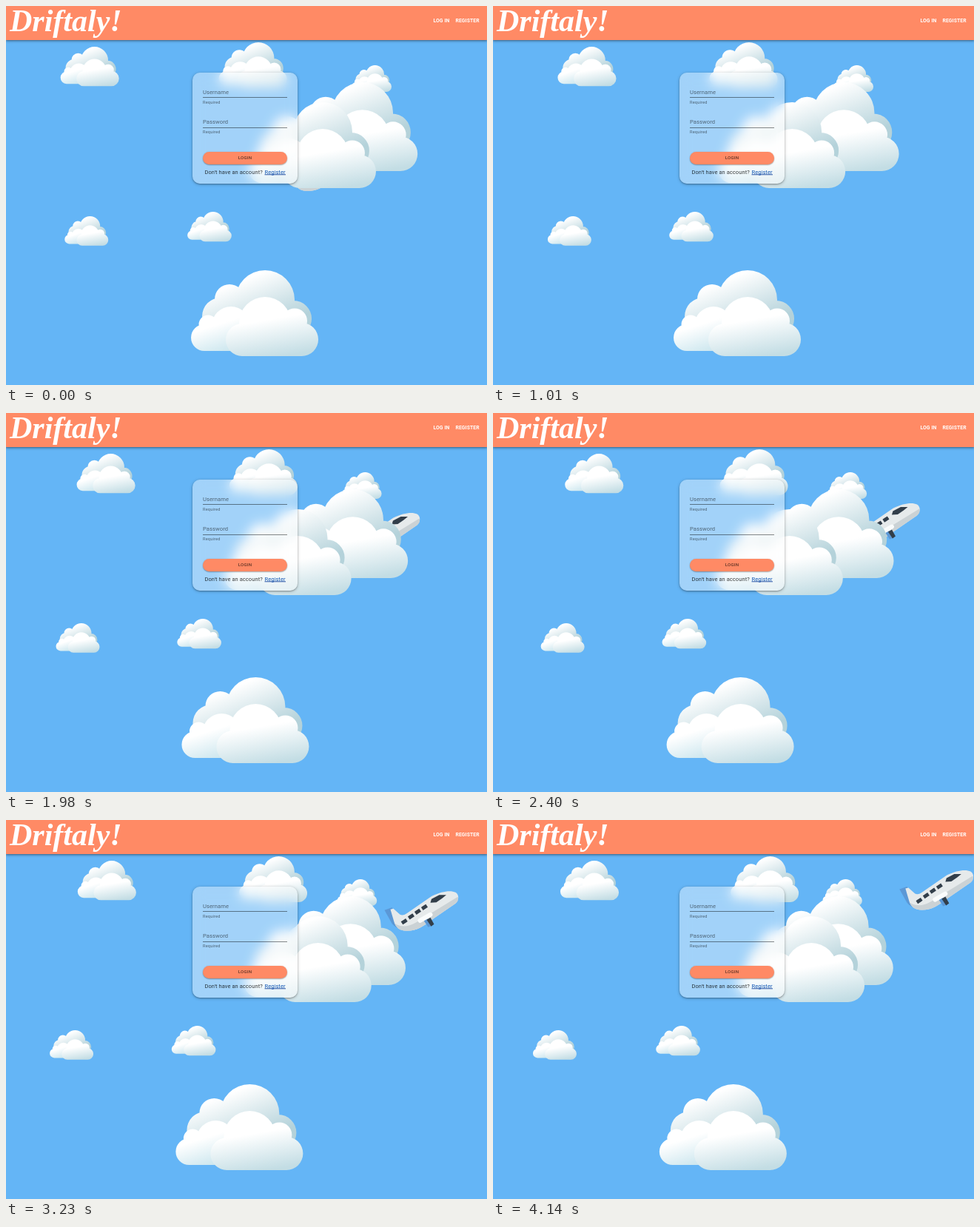
These frames come from a looping animation (650x512 px, 4210 ms). An HTML page:

```html
<!DOCTYPE html>
<html lang="en">
<head>
<meta charset="utf-8">
<title>Login</title>
<style>
  html, body { margin: 0; width: 100%; height: 100%; overflow: hidden; background: #64b5f6; }
  svg { position: absolute; left: 0; top: 0; width: 650px; height: 512px; }
  text { font-family: Roboto, sans-serif; }
  header {
    position: absolute; left: 0; top: 0; width: 650px; height: 45.5px; background: #ff8a65;
    box-shadow: 0 1px 2px rgba(0,0,0,.25), 0 2px 3px rgba(0,0,0,.14), 0 1px 5px rgba(0,0,0,.12);
  }
  .card {
    position: absolute; left: 252px; top: 90px; width: 142px; height: 149.5px; border-radius: 10px;
    background: rgba(255,255,255,.4); backdrop-filter: blur(8px);
    box-shadow: 0 1px 2px rgba(0,0,0,.25), 0 1px 4px rgba(0,0,0,.25);
  }
  .button {
    position: absolute; left: 266px; top: 197px; width: 114px; height: 17px; border-radius: 8.5px;
    background: #ff8a65; box-shadow: 0 1px 1.5px rgba(0,0,0,.3), 0 0 2px rgba(0,0,0,.12);
  }
  .logo { font: italic bold 42px "Liberation Serif", serif; fill: #fff; }
  .nav { font-size: 6.8px; font-weight: 700; letter-spacing: .1px; fill: #fff; }
  .label { font-size: 7.6px; letter-spacing: .07px; fill: rgba(0,0,0,.52); }
  .hint { font-size: 5.6px; letter-spacing: .19px; fill: rgba(0,0,0,.54); }
  .login { font-size: 6.1px; font-weight: 500; letter-spacing: .2px; fill: rgba(0,0,0,.62); text-anchor: middle; }
  .ask { font-size: 7.5px; letter-spacing: .07px; fill: rgba(0,0,0,.75); }
  .link { fill: #1559b5; }
</style>
</head>
<body>
<svg viewBox="0 0 650 512">
  <defs>
    <linearGradient id="back" x1=".3" y1=".05" x2=".85" y2=".9">
      <stop offset=".12" stop-color="#fff"/><stop offset=".85" stop-color="#b4d2da"/>
    </linearGradient>
    <linearGradient id="side" x1=".25" y1=".1" x2=".75" y2="1.05">
      <stop offset=".3" stop-color="#fff"/><stop offset="1" stop-color="#bfe0ea"/>
    </linearGradient>
    <linearGradient id="front" x1=".38" y1=".1" x2=".62" y2="1">
      <stop offset=".32" stop-color="#fff"/><stop offset="1" stop-color="#c3dde4"/>
    </linearGradient>
    <g id="cloud"></g>
  </defs>
  <g id="sky"></g>
  <g id="plane">
    <path d="M526 111L536 107.5 546 121 546 136Q540 134 536 129Z" fill="#5b98d6"/>
    <path d="M534 110L538 109 547 117Q551 119 556 115.5L590 92C604 85 616 84 622 87C627 90 627 97 622 102L590 124C578 133 570 139 556 139C546 139 541 134 539 127Z" fill="#e6eaeb"/>
    <path d="M540 129Q552 137 568 128L625 93Q627 98 622 102L590 124C578 133 570 139 556 139C547 139 542 135 540 129Z" fill="#cbd2d5"/>
    <path d="M588 101L589.5 96 600 90.5 609.5 90.5 604 95 596 100.5Z" fill="#323e4a"/>
    <path d="M551.5 127.2l2.4-1.6M560.8 120.3l2.4-1.6M569.8 113.8l2.4-1.6M578.8 107.8l2.4-1.6" stroke="#323e4a" stroke-width="4.8" stroke-linecap="square"/>
    <path d="M579 125L584 122 590 132 585 134Z" fill="#5b98d6"/>
    <path d="M583 124L588 121 593 130 589 133Z" fill="#323e4a"/>
    <path d="M574 125L588 117" stroke="#fafcfc" stroke-width="6" stroke-linecap="round"/>
  </g>
</svg>
<header></header>
<div class="card"></div>
<div class="button"></div>
<svg viewBox="0 0 650 512">
  <text class="logo" x="5" y="34">Driftaly!</text>
  <text class="nav" x="577.5" y="21.5">LOG IN</text>
  <text class="nav" x="607.5" y="21.5">REGISTER</text>
  <text class="label" x="266" y="118.7">Username</text>
  <text class="hint" x="266" y="131.5">Required</text>
  <text class="label" x="266" y="159.2">Password</text>
  <text class="hint" x="266" y="172.2">Required</text>
  <path d="M266 123.5H380M266 164.5H380" stroke="rgba(0,0,0,.46)"/>
  <text class="login" x="323" y="207.3">LOGIN</text>
  <text class="ask" x="268.5" y="226.8">Don't have an account?</text>
  <text class="ask link" x="349.5" y="226.8">Register</text>
  <path d="M349.5 227.8H378" stroke="#17479e" stroke-width=".9"/>
</svg>
<script>
  const LOOP = 4210;
  const NS = 'http://www.w3.org/2000/svg';
  const sky = document.getElementById('sky');
  const plane = document.getElementById('plane');

  function add(parent, tag, attrs) {
    const node = document.createElementNS(NS, tag);
    for (const key in attrs) node.setAttribute(key, attrs[key]);
    return parent.appendChild(node);
  }

  const circle = (x, y, r) => `M${x - r} ${y}a${r} ${r} 0 0 1 ${2 * r} 0a${r} ${r} 0 0 1 ${-2 * r} 0z`;
  const box = (x, y, w, h) => `M${x} ${y}h${w}v${h}h${-w}z`;

  // One cloud is 172 x 116: a back layer, a lower left layer and a front layer.
  const layers = {
    back: circle(52, 39, 20) + circle(100, 40, 40) + circle(40, 62, 25) + circle(138.5, 65.5, 24.5) + box(40, 50, 98, 38),
    side: circle(54, 75, 26) + circle(23, 73, 12.5) + circle(18, 91, 18) + box(18, 75, 82, 34),
    front: circle(100, 71, 35) + circle(140, 68.5, 17) + circle(69, 94, 22) + circle(149.5, 93.5, 22.5) + box(69, 72, 80, 44)
  };
  const shape = document.getElementById('cloud');
  for (const name in layers) add(shape, 'path', { d: layers[name], fill: `url(#${name})` });

  // Each cloud drifts as x = mid + amp * sin(rate * (t - start)), t in seconds.
  const clouds = [
    { y: 55, scale: .46, mid: 53.6, amp: 44, rate: .4, start: -1.18 },
    { y: 49, scale: .535, mid: 304.8, amp: 17.4, rate: .64, start: 2.25 },
    { y: 80, scale: .31, mid: 462.2, amp: -17, rate: .41, start: .8 },
    { y: 103, scale: 1.035, mid: 382.5, amp: -20.6, rate: .4, start: -.53 },
    { y: 130, scale: 1, mid: 312.3, amp: 18.5, rate: 1.45, start: -1.47 },
    { y: 284, scale: .343, mid: 66, amp: -17.2, rate: .4, start: 2.2 },
    { y: 278, scale: .347, mid: 236.8, amp: -18, rate: .4, start: 1.2 },
    { y: 357, scale: 1, mid: 238.7, amp: -17.2, rate: .4, start: 1.8 }
  ];
  for (const cloud of clouds) cloud.node = add(sky, 'use', { href: '#cloud' });
  sky.insertBefore(plane, clouds[3].node);

  function draw(t) {
    for (const { node, y, scale, mid, amp, rate, start } of clouds) {
      const x = mid + amp * Math.sin(rate * (t - start));
      node.setAttribute('transform', `translate(${x} ${y}) scale(${scale})`);
    }
    const flown = t - 3.58;
    plane.setAttribute('transform', `translate(${41.6 * flown} ${-31 * flown})`);
  }

  const begin = performance.now();
  function tick() {
    draw((performance.now() - begin) % LOOP / 1000);
    requestAnimationFrame(tick);
  }
  tick();
</script>
</body>
</html>
```
